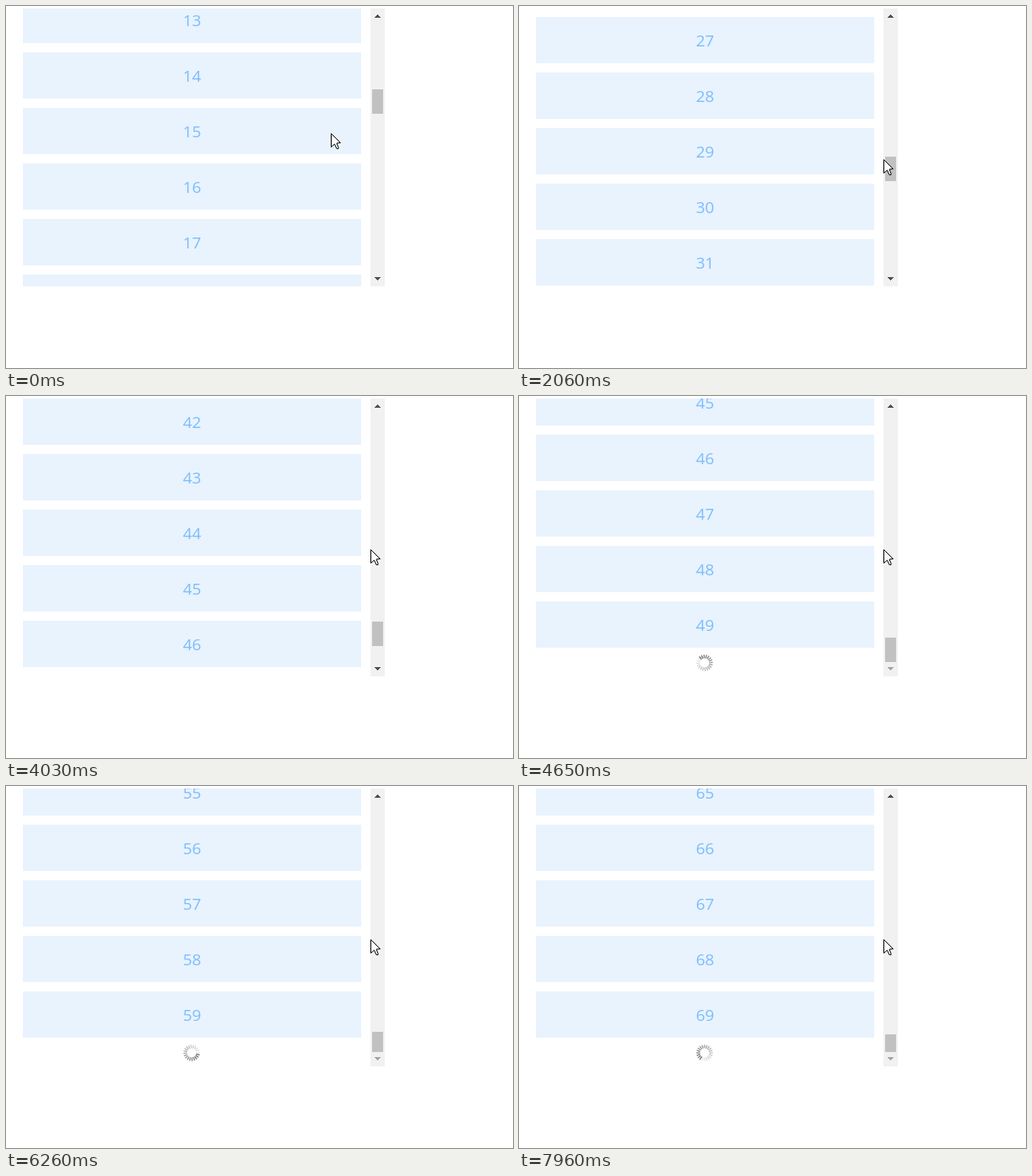
An HTML page with a canvas for the animation above (8 s loop, 601 by 430 pixels).

```html
<!DOCTYPE html>
<html lang="en">
<head>
<meta charset="utf-8">
<title>Infinite list</title>
<style>
  html, body { margin: 0; width: 100%; height: 100%; overflow: hidden; background: #fff; }
  canvas { display: block; }
</style>
</head>
<body>
<canvas id="stage" width="601" height="430"></canvas>
<script>
const ctx = document.getElementById('stage').getContext('2d');
const LOOP = 8000, TICK = 89.44;
const VIEW = { x: 20, y: 3, w: 401, h: 330 };
const PITCH = 66, ITEM_H = 55, FOOTER = 34;
const TRACK = { x: 432, y: 20, h: 296 };
const START_SCROLL = 883, NOTCH = 100;

// Turns of the mouse wheel: first tick, length in ticks, notches
const WHEEL = [
  [16, 2, 4], [21, 3, 5], [29, 3, 4], [36, 3, 4], [44, 4, 5], [54, 1, 3],
  [62, 3, 3], [70, 1, 1], [75, 1, 1], [81, 2, 3], [85, 3, 3]
];
const LOADS = [54, 75];

const clamp01 = v => Math.min(1, Math.max(0, v));
const ease = v => v * v * (3 - 2 * v);

const itemCount = tick => 50 + 10 * LOADS.filter(load => load <= tick).length;
const contentHeight = count => count * PITCH + FOOTER;
const maxScroll = count => contentHeight(count) - VIEW.h;

function scrollAt(tick) {
  return WHEEL.reduce((scroll, [first, length, notches]) => {
    const turned = Math.floor(notches * clamp01((tick - first + 1) / length));
    return Math.min(scroll + turned * NOTCH, maxScroll(itemCount(first)));
  }, START_SCROLL);
}

// The pointer drifts right past the list, then comes back to the scrollbar.
function pointerAt(tick) {
  const out = ease(clamp01(tick / 6));
  const back = ease(clamp01((tick - 12) / 3));
  return [
    Math.round(385 + 78 * out - 31 * back),
    Math.round(151 + 47 * out - 16 * back)
  ];
}

function drawItems(scroll, count) {
  ctx.font = '19px "Open Sans", "Noto Sans", sans-serif';
  ctx.textAlign = 'center';
  for (let n = 0; n < count; n++) {
    const y = 14 + n * PITCH - scroll;
    if (y < -ITEM_H || y > VIEW.y + VIEW.h) continue;
    ctx.fillStyle = '#e8f3fe';
    ctx.fillRect(VIEW.x, y, VIEW.w, ITEM_H);
    ctx.fillStyle = '#7dbcfc';
    ctx.fillText(n, VIEW.x + VIEW.w / 2, y + 35);
  }
}

function drawSpinner(y, tick) {
  const spokes = 20;
  ctx.save();
  ctx.translate(220, y);
  ctx.rotate((-130 - 32 * (tick - 52)) * Math.PI / 180);
  ctx.lineWidth = 1.3;
  for (let i = 0; i < spokes; i++) {
    const shade = Math.round(105 + 135 * i / spokes);
    ctx.strokeStyle = `rgb(${shade},${shade},${shade})`;
    ctx.beginPath();
    ctx.moveTo(5.5, 0);
    ctx.lineTo(9.8, 0);
    ctx.stroke();
    ctx.rotate(2 * Math.PI / spokes);
  }
  ctx.restore();
}

function drawArrow(tipY, direction, color) {
  ctx.fillStyle = color;
  for (let i = 0; i < 4; i++) ctx.fillRect(440 - i, tipY + i * direction, 2 * i + 1, 1);
}

function drawScrollbar(scroll, count) {
  const max = maxScroll(count);
  const thumb = Math.round(TRACK.h * VIEW.h / contentHeight(count));
  const offset = Math.ceil(scroll / max * (TRACK.h - thumb));
  ctx.fillStyle = '#f1f1f1';
  ctx.fillRect(TRACK.x, VIEW.y, 17, VIEW.h);
  ctx.fillStyle = '#c1c1c1';
  ctx.fillRect(TRACK.x + 2, TRACK.y + offset, 13, thumb);
  drawArrow(10, 1, '#505050');
  drawArrow(325, -1, scroll >= max ? '#a3a3a3' : '#505050');
}

function drawPointer(x, y) {
  ctx.save();
  ctx.translate(x + 0.5, y + 0.5);
  ctx.fillStyle = '#fff';
  ctx.strokeStyle = '#000';
  ctx.lineWidth = 1;
  const outline = new Path2D('M0 0V16L4 12.5L6.5 18H8.5V16.5L6.5 11.5L11 11Z');
  ctx.fill(outline);
  ctx.stroke(outline);
  ctx.restore();
}

function draw(t) {
  const tick = Math.floor((t + 8) / TICK);
  const scroll = scrollAt(tick);
  const count = itemCount(tick);

  ctx.fillStyle = '#fff';
  ctx.fillRect(0, 0, 601, 430);

  ctx.save();
  ctx.beginPath();
  ctx.rect(VIEW.x, VIEW.y, VIEW.w, VIEW.h);
  ctx.clip();
  drawItems(scroll, count);
  drawSpinner(21 + count * PITCH - scroll, tick);
  ctx.restore();

  drawScrollbar(scroll, count);
  drawPointer(...pointerAt(tick));
}

const start = performance.now();
function frame() {
  draw((performance.now() - start) % LOOP);
  requestAnimationFrame(frame);
}
frame();
</script>
</body>
</html>
```
